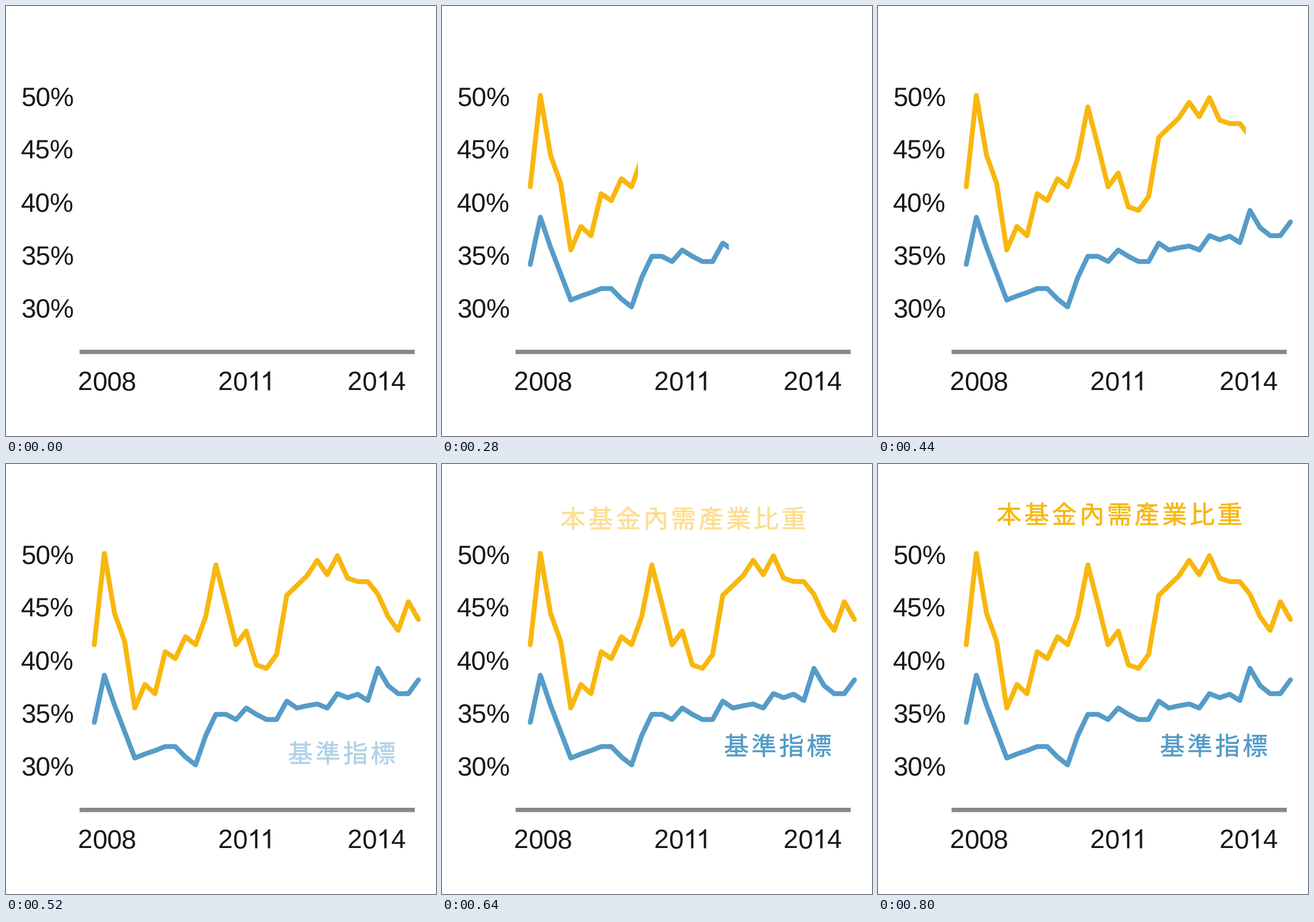
Recreate the animation shown at these times as a matplotlib script. Size 748 px wide and 748 px high, loop 0.84 s.

```python
import math

import numpy as np
import matplotlib.pyplot as plt
from matplotlib.animation import FuncAnimation
from matplotlib.patches import Polygon, Rectangle
from matplotlib.patheffects import withStroke
from matplotlib.transforms import Bbox, TransformedBbox

SIZE, DPI = 748, 100
STEP, LOOP = 40, 840
PX = 72 / DPI  # points per pixel

INK = "#1b1718"
GREY = "#888888"
YELLOW = np.array([248, 183, 14]) / 255
BLUE = np.array([86, 156, 200]) / 255

# Height of each line, one value per quarter
FUND = [314, 155, 259, 308, 424, 383, 399, 326, 338, 300, 314, 265, 175, 243,
        314, 290, 349, 355, 331, 228, 211, 194, 167, 192, 159, 198, 204, 204,
        226, 265, 289, 239, 270]
BENCH = [449, 367, 419, 465, 511, 504, 498, 491, 491, 509, 523, 472, 435, 435,
         444, 424, 435, 444, 444, 412, 424, 420, 417, 424, 399, 406, 400, 411,
         355, 385, 399, 399, 375]

plt.rcParams["text.hinting"] = "none"
fig = plt.figure(figsize=(SIZE / DPI, SIZE / DPI), dpi=DPI, facecolor="white")
ax = fig.add_axes([0, 0, 1, 1])
ax.set_xlim(0, SIZE)
ax.set_ylim(SIZE, 0)
ax.axis("off")

LABEL = 46
DIGIT = 0.556 * LABEL  # advance of one digit
ONE = np.array([(0.373, 0), (0.285, 0), (0.285, 0.56), (0.201, 0.5),
                (0.109, 0.454), (0.109, 0.539), (0.238, 0.623),
                (0.316, 0.719), (0.373, 0.719)])


def label(x, y, text):
    ax.text(x, y, text, family="Liberation Sans", size=LABEL * PX, color=INK,
            ha="left", va="baseline")


def year(x, text, y=668.5):
    """Place digits one by one; a 1 has no foot, and a pair of them is tight."""
    last = ""
    for c in text:
        if c == "1":
            if last == "1":
                x -= 0.074 * LABEL
            ax.add_patch(Polygon(ONE * [LABEL, -LABEL] + [x, y], color=INK, lw=0))
        else:
            label(x, y, c)
        last = c
        x += DIGIT


def draw_axes():
    for i, pct in enumerate(range(50, 25, -5)):
        label(26, 173.4 + 92 * i, f"{pct}%")
    for x, text in ((124.4, "2008"), (369, "2011"), (593.7, "2014")):
        year(x, text)
    ax.add_patch(Rectangle((128, 598), 583, 7.5, color=GREY, lw=0, snap=False))


class Series:
    """A line wiped in from the left."""

    def __init__(self, heights, color, start):
        self.start = start
        x = np.linspace(153.5, 717.5, len(heights))
        self.line, = ax.plot(x, np.array(heights) + 0.5, color=color,
                             lw=8.5 * PX, solid_capstyle="round",
                             solid_joinstyle="round")

    def update(self, t):
        phase = np.clip(0.234 * (t - self.start - 160) / STEP,
                        -math.pi / 2, math.pi / 2)
        edge = round(420 + 340 * math.sin(phase))
        box = Bbox.from_extents(0, 0, edge, SIZE)
        self.line.set_clip_box(TransformedBbox(box, ax.transData))


class Caption:
    """Spaced characters that rise while fading in."""
    SPAN, PITCH, FONT = 240, 48, 43.5

    def __init__(self, text, x, middle, color, start, rise):
        self.base = middle + 0.38 * self.FONT
        self.color, self.start, self.rise = color, start, rise
        self.chars = [ax.text(x + i * self.PITCH, self.base, c, ha="center",
                              va="baseline", family="Noto Sans CJK JP",
                              size=self.FONT * PX)
                      for i, c in enumerate(text)]

    def update(self, t):
        p = np.clip((t - self.start) / self.SPAN, 0, 1)
        fade = min(1, 1.37 * p)
        color = tuple(1 - fade * (1 - self.color))
        y = self.base + self.rise * (1 - p) ** 3.6
        for c in self.chars:
            c.set_visible(p > 0)
            c.set_y(y)
            c.set_color(color)
            c.set_path_effects([withStroke(linewidth=0.5 * PX, foreground=color)])


draw_axes()
parts = [
    Series(BENCH, BLUE, 80),
    Series(FUND, YELLOW, 160),
    Caption("基準指標", 512, 489.5, BLUE, 440, 56),
    Caption("本基金內需產業比重", 228, 87, YELLOW, 560, 32),
]


def draw(i):
    for part in parts:
        part.update(i * STEP)
    return []


anim = FuncAnimation(fig, draw, frames=LOOP // STEP, interval=STEP,
                     repeat=True, repeat_delay=0, blit=False)
plt.show()
```
